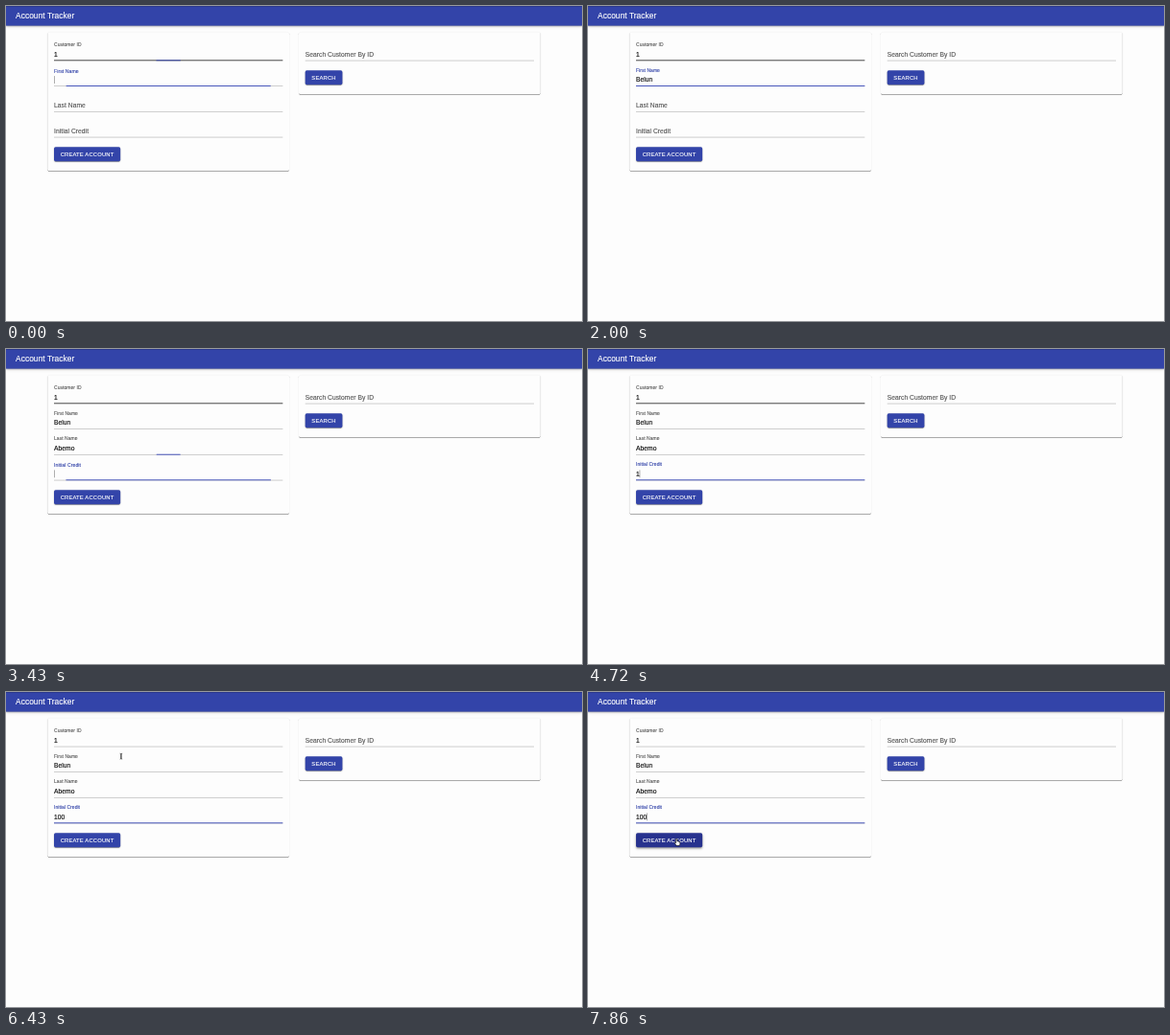
Animation, 600 px wide and 329 px high, one loop 8000 ms. Source, as an HTML page:

```html
<!DOCTYPE html>
<html lang="en">
<head>
<meta charset="utf-8">
<title>Account Tracker</title>
<style>
  html, body { margin: 0; width: 100%; height: 100%; overflow: hidden; background: #fdfdfd; }
  #app {
    position: absolute; left: 0; top: 0; width: 1440px; height: 788px;
    transform: translateY(.58px) scale(.4166667); transform-origin: 0 0;
    font: 16px/19px "Liberation Sans", Arial, sans-serif; letter-spacing: .00938em;
    color: rgba(0,0,0,.95); -webkit-text-stroke: .35px;
  }
  #app * { box-sizing: border-box; }
  header {
    position: absolute; left: 0; right: 0; top: -2px; height: 50px; padding: 2px 0 0 24px;
    background: #3344a9; color: #fff; font-size: 20px; line-height: 48px; letter-spacing: .0095em;
    box-shadow: 0 2px 4px -1px rgba(0,0,0,.3), 0 4px 5px rgba(0,0,0,.2), 0 1px 10px rgba(0,0,0,.15);
  }
  header::before { content: ""; position: absolute; inset: 0 0 auto; height: 2.4px; background: rgba(0,0,0,.3); }
  .card {
    position: absolute; top: 64px; width: 604px; padding: 24px 16px; border-radius: 4px; background: #fdfdfd;
    box-shadow: 0 2px 1px -1px rgba(0,0,0,.34), 0 1px 1px rgba(0,0,0,.22), 0 1px 3px rgba(0,0,0,.16);
  }
  .field { position: relative; height: 48px; margin-bottom: 16px; }
  .field label {
    position: absolute; left: 0; top: 0; line-height: 1; white-space: nowrap;
    color: rgba(0,0,0,.62); transform-origin: 0 0;
  }
  .field.focus label { color: #3344a9; }
  .value { position: absolute; left: 0; top: 22px; height: 19px; white-space: pre; }
  .caret { position: absolute; left: 100%; top: 0; width: 1px; height: 19px; background: rgba(0,0,0,.75); visibility: hidden; }
  .line, .bar { position: absolute; left: 0; right: 0; bottom: 0; }
  .line { height: 1px; background: rgba(0,0,0,.45); }
  .hover .line { height: 2px; background: rgba(0,0,0,.87); }
  .bar { height: 2px; background: #2f40b8; }
  .button {
    display: inline-block; height: 36px; margin-top: 8px; padding: 0 16px; border-radius: 4px; vertical-align: top;
    background: #3344a9; color: #fff; font-size: 14px; line-height: 36px; letter-spacing: .02857em;
    box-shadow: 0 3px 1px -2px rgba(0,0,0,.25), 0 2px 2px rgba(0,0,0,.18), 0 1px 5px rgba(0,0,0,.14);
  }
  #pointer { position: absolute; left: -9px; top: -10px; width: 18px; height: 20px; }
</style>
</head>
<body>
<div id="app">
  <header>Account Tracker</header>
  <div class="card" id="create" style="left:104px"></div>
  <div class="card" id="search" style="left:732px"></div>
  <svg id="pointer" viewBox="0 0 18 20">
    <path id="beam" d="M6 3q3 0 3 2v10q0 2-3 2M12 3q-3 0-3 2v10q0 2 3 2" fill="none" stroke="#000" stroke-width="1.4"/>
    <path id="hand" d="M6 10V3q0-2 1.5-2T9 3v5q3-1 4 1 3-.5 3 2v3q0 3-2 5H7q-1-3-4-6-1-2 .5-2.5T6 12z"
      fill="#fff" stroke="#000" stroke-width="1.5"/>
  </svg>
</div>
<script>
const $ = id => document.getElementById(id);
const LOOP = 8000, TICK = 1000 / 7, HOVER_AT = 6870, MOVE_AT = 6280;

function add(parent, cls, text = '', tag = 'div') {
  const el = document.createElement(tag);
  el.className = cls;
  el.textContent = text;
  return parent.appendChild(el);
}

function addField(card, name) {
  const box = add(card, 'field');
  const label = add(box, '', name, 'label');
  const value = add(box, 'value');
  const text = add(value, '', '', 'span');
  const caret = add(value, 'caret');
  add(box, 'line');
  return { box, label, text, caret, bar: add(box, 'bar') };
}

const fields = ['Customer ID', 'First Name', 'Last Name', 'Initial Credit'].map(n => addField($('create'), n));
const createBtn = add($('create'), 'button', 'CREATE ACCOUNT');
const searchField = addField($('search'), 'Search Customer By ID');
add($('search'), 'button', 'SEARCH');

// When each field gains and loses focus
const focus = [[-5000, -117], [-117, 2080], [2080, 3311], [3311, 1e5]];

// Keystrokes: time, field, text so far
const keys = [
  [-5000, 0, '1'], [-117, 1, ''], [850, 1, 'Be'], [1250, 1, 'Be'], [1490, 1, 'Belun'],
  [2080, 2, ''], [2560, 2, 'A'], [2705, 2, 'Ab'], [2850, 2, 'Abe'], [2995, 2, 'Abem'], [3140, 2, 'Abemo'],
  [3311, 3, ''], [4700, 3, '1'], [5280, 3, '10'], [5490, 3, '100']
];

// Pointer path: time, x, y
const path = [[MOVE_AT, 300, 118], [6857, 226, 372], [7400, 226, 372], [7857, 223, 375]];

const clamp = v => Math.min(1, Math.max(0, v));
const mix = (a, b, p) => a + (b - a) * p;

// cubic-bezier(0, 0, .2, 1)
function ease(x) {
  x = clamp(x);
  let lo = 0, hi = 1;
  for (let i = 0; i < 20; i++) {
    const s = (lo + hi) / 2;
    if (.6 * (1 - s) * s * s + s ** 3 < x) lo = s; else hi = s;
  }
  return 3 * (1 - lo) * lo * lo + lo ** 3;
}

function drawField(f, shrink, bar, focused, text, caret) {
  f.label.style.transform = `translateY(${mix(24, 1.5, shrink)}px) scale(${mix(1, .75, shrink)})`;
  f.bar.style.transform = `scaleX(${bar})`;
  f.box.classList.toggle('focus', focused);
  f.text.textContent = text;
  f.caret.style.visibility = caret ? 'visible' : 'hidden';
}

function drawPointer(t) {
  let x = path[0][1], y = path[0][2];
  for (let i = 1; i < path.length; i++) {
    const [t0, x0, y0] = path[i - 1], [t1, x1, y1] = path[i];
    if (t < t0) break;
    const p = clamp((t - t0) / (t1 - t0)), q = p * p * (3 - 2 * p);
    x = mix(x0, x1, q);
    y = mix(y0, y1, q);
  }
  const over = y > 352;
  $('pointer').style.visibility = t < MOVE_AT ? 'hidden' : 'visible';
  $('pointer').style.transform = `translate(${x}px, ${y}px)`;
  $('hand').style.display = over ? '' : 'none';
  $('beam').style.display = over ? 'none' : '';
}

function drawButton(t) {
  const p = ease((t - HOVER_AT) / 250);
  const sh = (y, blur, spread, a) => `0 ${y}px ${blur}px ${spread}px rgba(0,0,0,${a})`;
  createBtn.style.background = `rgb(${mix(51, 39, p)},${mix(68, 50, p)},${mix(169, 142, p)})`;
  createBtn.style.boxShadow = [
    sh(mix(3, 2, p), mix(1, 4, p), mix(-2, -1, p), .25),
    sh(mix(2, 4, p), mix(2, 5, p), 0, .18),
    sh(1, mix(5, 10, p), 0, .14)
  ].join();
}

function draw(now) {
  const tick = Math.floor((now % LOOP + 3) / TICK);
  const t = tick < 6 ? 0 : tick * TICK;
  const done = keys.filter(k => k[0] <= t);
  const last = done[done.length - 1];
  const blink = (t - last[0]) % 1000 < 500;

  fields.forEach((f, i) => {
    const [on, off] = focus[i];
    const shown = done.filter(k => k[1] === i).pop();
    const shrink = ease((t - on) / 200);
    const bar = t < off ? shrink : 1 - ease((t - off) / 200);
    const focused = t >= on && t < off;
    drawField(f, shrink, bar, focused, shown ? shown[2] : '', focused && blink);
  });
  fields[0].box.classList.toggle('hover', t < MOVE_AT);
  drawButton(t);
  drawPointer(t);
}

drawField(searchField, 0, 0, false, '', false);
const start = performance.now();
function loop() {
  draw(performance.now() - start);
  requestAnimationFrame(loop);
}
loop();
</script>
</body>
</html>
```
